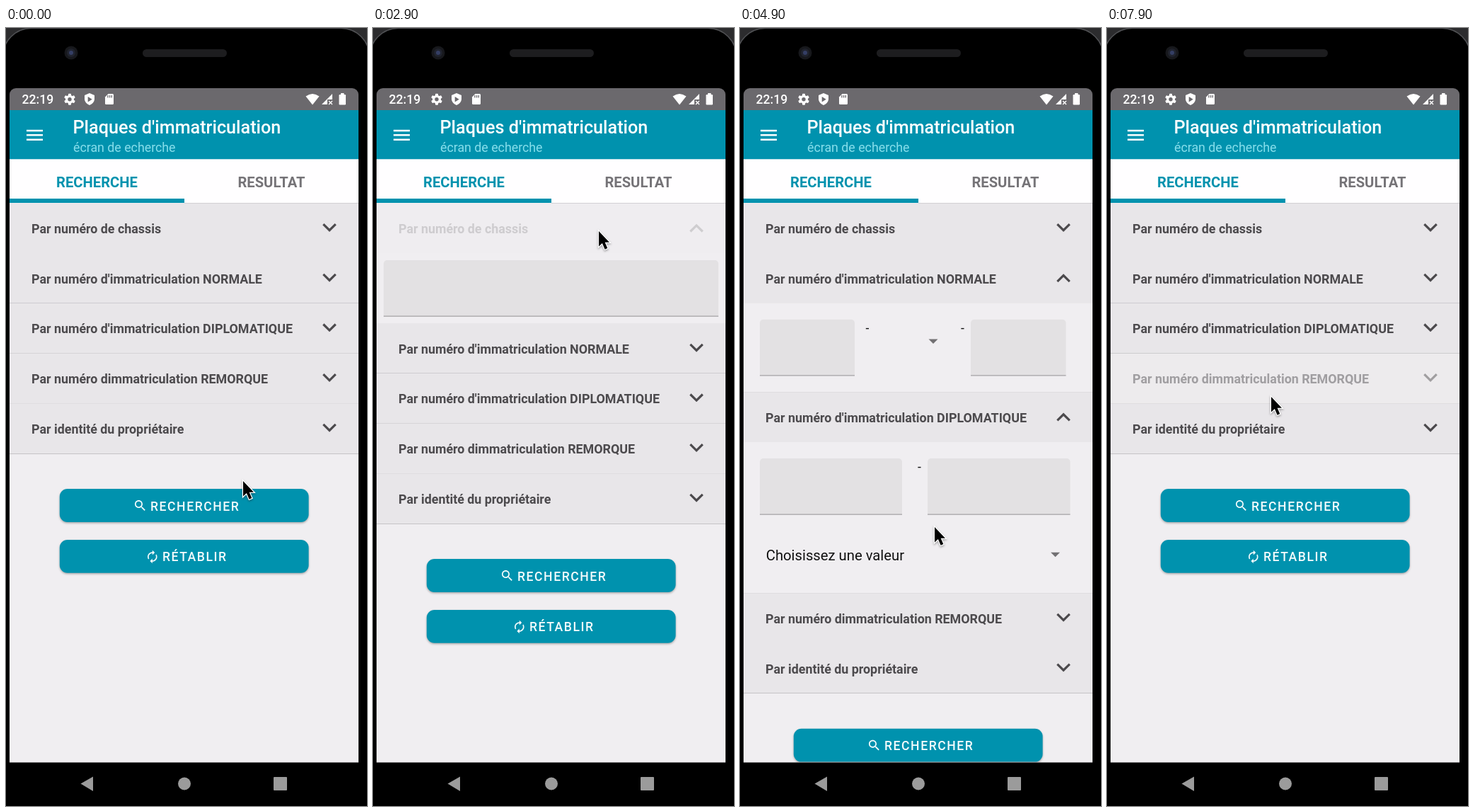
An HTML page with a canvas for the animation above (8 s loop, 510 px wide and 1099 px high).

```html
<!DOCTYPE html>
<html lang="fr">
<head>
<meta charset="utf-8">
<title>Plaques d'immatriculation</title>
<style>
  html, body { margin: 0; width: 100%; height: 100%; overflow: hidden; background: #000; }
  canvas { display: block; }
</style>
</head>
<body>
<canvas id="stage" width="510" height="1099"></canvas>
<script>
const c = document.getElementById('stage').getContext('2d');
const LOOP = 8000, STEP = 100;
const TEAL = '#0092ae', PAGE = '#f0eef1', ROW = '#e8e6e9', INK = '#4c4a4d', LINE = '#c5c3c6';
const LIST_TOP = 247.4, ROW_H = 70.7;

const sections = [
  { title: 'Par numéro de chassis', body: 99, draw: y => field(15, y + 10, 473) },
  { title: "Par numéro d'immatriculation NORMALE", body: 125.5, draw: y => {
    field(28, y + 23, 134); field(326, y + 23, 134.5);
    dash(180, y); dash(314.5, y); dropArrow(273, y + 54);
  } },
  { title: "Par numéro d'immatriculation DIPLOMATIQUE", body: 213.2, draw: y => {
    pair(y);
    text('Choisissez une valeur', 36.7, y + 167.4, 20.25, 400, '#111');
    dropArrow(445.5, y + 159);
  } },
  { title: 'Par numéro dimmatriculation REMORQUE', body: 125.5, draw: pair },
  { title: 'Par identité du propriétaire', body: 0, draw: () => {} }
];

// section, press time, time when it toggles and the finger lifts
const taps = [
  [0, 2200, 2400], [0, 2800, 3000], [1, 3250, 3700], [2, 4400, 4600],
  [3, 5250, 5600], [1, 6000, 6280], [2, 6700, 6900], [3, 7500, 7830]
];

// time, x, y of the pointer tip
const pointerPath = [
  [0, 333, 637], [300, 345, 625], [400, 345, 625], [1300, 358, 291], [1700, 317, 284],
  [3000, 317, 284], [3300, 309, 378], [3900, 309, 378], [4300, 288, 540], [4700, 288, 540],
  [4900, 273, 702], [5300, 266, 822], [5600, 266, 822], [6100, 254, 322], [6500, 254, 322],
  [6700, 231, 437], [7100, 231, 437], [7500, 230, 518], [LOOP, 230, 518]
];

const searchIcon = new Path2D('M15.5 14h-.79l-.28-.27C15.41 12.59 16 11.11 16 9.5 16 5.91 13.09 3 9.5 3S3 5.91 3 9.5 5.91 16 9.5 16c1.61 0 3.09-.59 4.23-1.57l.27.28v.79l5 4.99L20.49 19l-4.99-5zm-6 0C7.01 14 5 11.99 5 9.5S7.01 5 9.5 5 14 7.01 14 9.5 11.99 14 9.5 14z');
const resetIcon = new Path2D('M12 6v3l4-4-4-4v3c-4.42 0-8 3.58-8 8 0 1.57.46 3.03 1.24 4.26L6.7 14.8c-.45-.83-.7-1.79-.7-2.8 0-3.31 2.69-6 6-6zm6.76 1.74L17.3 9.2c.44.84.7 1.79.7 2.8 0 3.31-2.69 6-6 6v-3l-4 4 4 4v-3c4.42 0 8-3.58 8-8 0-1.57-.46-3.03-1.24-4.26z');
const pointer = new Path2D('M0 0V24L5.4 19 9.6 28.5 13.6 26.8 9.6 17.5H16.6Z');

const clamp = v => Math.max(0, Math.min(1, v));

function rect(x, y, w, h, color, radius = 0) {
  c.fillStyle = color;
  c.beginPath();
  c.roundRect(x, y, w, h, radius);
  c.fill();
}

function disc(x, y, r, color) {
  c.fillStyle = color;
  c.beginPath();
  c.arc(x, y, r, 0, 7);
  c.fill();
}

function shape(points, color) {
  c.fillStyle = color;
  c.fill(new Path2D(points));
}

function text(str, x, y, size, weight, color, align = 'left', spacing = 0) {
  c.font = `${weight} ${size}px Roboto, sans-serif`;
  c.letterSpacing = spacing + 'px';
  c.textAlign = align;
  c.fillStyle = color;
  c.fillText(str, x, y);
}

function field(x, y, w) {
  rect(x, y, w, 79, '#e3e1e3', [5, 5, 0, 0]);
  rect(x, y + 78.5, w, 1.2, '#a3a1a4');
}

function dash(x, y) {
  text('-', x, y + 41, 17.6, 400, '#111', 'center');
}

function pair(y) {
  field(28, y + 23, 201);
  field(265, y + 23, 201.5);
  dash(253.5, y);
}

function dropArrow(x, y) {
  shape(`M${x - 6.5} ${y - 3.2}h13l-6.5 6.5z`, '#727073');
}

function chevron(y, open) {
  const d = open ? -4.3 : 4.3;
  c.strokeStyle = INK;
  c.lineWidth = 3.2;
  c.beginPath();
  c.moveTo(448.3, y - d);
  c.lineTo(457, y + d);
  c.lineTo(465.7, y - d);
  c.stroke();
}

function button(y, label, labelX, icon, iconX, iconY) {
  c.save();
  c.shadowColor = 'rgba(0,0,0,.3)';
  c.shadowBlur = 3;
  c.shadowOffsetY = 1.5;
  rect(75.8, y, 351.8, 46.8, TEAL, 11);
  c.restore();
  text(label, labelX, y + 30.4, 17.58, 500, '#f4fbfc', 'left', 1.57);
  c.save();
  c.translate(iconX, y + iconY);
  c.scale(.85, .85);
  c.fill(icon);
  c.restore();
}

function stateAt(t) {
  const open = sections.map(() => false), alpha = sections.map(() => 1);
  for (const [i, press, lift] of taps) {
    if (t < press) continue;
    alpha[i] = t < lift ? 1 - .8 * clamp((t - press) / 100) : .2 + .8 * clamp((t - lift) / 200);
    if (t >= lift) open[i] = !open[i];
  }
  return { open, alpha };
}

function drawPhone() {
  rect(0, 0, 510, 1099, '#2c2c2e');
  c.strokeStyle = '#505154';
  c.lineWidth = 3;
  c.beginPath();
  c.roundRect(-4, 1, 517, 1200, 40);
  c.stroke();
  c.fillStyle = '#000';
  c.fill();
  disc(92, 35, 9.5, '#17181c');
  disc(92, 35, 6, '#20232e');
  disc(92, 35, 3, '#343e64');
  rect(193, 30, 119, 11, '#1d1d1f', 5.5);
  shape('M105.5 1067.5L123 1057.5V1078Z', '#9b9b9b');
  disc(252, 1067.5, 9, '#9b9b9b');
  rect(378, 1058, 19, 19, '#9b9b9b', 1);
}

function drawStatus() {
  const bar = '#6b696d', white = '#fff';
  rect(5, 85, 493, 31, bar, [9, 9, 0, 0]);
  text('22:19', 22.5, 107, 17.58, 500, white);
  for (let i = 0; i < 6; i++) {
    c.save();
    c.translate(90, 100.7);
    c.rotate(i * Math.PI / 3);
    rect(-2, -8, 4, 4.5, white, 1);
    c.restore();
  }
  disc(90, 100.7, 6, white);
  disc(90, 100.7, 2.7, bar);
  shape('M118 92l7 3v5c0 4-3 7.5-7 9-4-1.5-7-5-7-9v-5z', white);
  shape('M115.7 97v7.5l6-3.75z', bar);
  shape('M144.5 93h6q1.5 0 1.5 1.5v12q0 1.5-1.5 1.5h-9q-1.5 0-1.5-1.5v-9z', white);
  for (const x of [143.3, 146, 148.7]) rect(x, 95, 1.3, 3.5, bar);
  shape('M433 108.5L423.5 96.5Q433 89.5 442.5 96.5Z', white);
  shape('M446 108L461 93V101H454V108Z', white);
  c.strokeStyle = white;
  c.lineWidth = 1.4;
  c.stroke(new Path2D('M456 103l5 5m0-5l-5 5'));
  rect(470.5, 94, 9.5, 14.5, white, 1.2);
  rect(473, 92, 4.5, 3, white);
}

function drawBars() {
  rect(5, 115.5, 493, 70, TEAL);
  for (const y of [143.7, 150.1, 156.5]) rect(29, y, 23, 2.5, '#fff');
  text("Plaques d'immatriculation", 94.5, 149, 25.2, 500, '#fff');
  text('écran de echerche', 95, 174.5, 17.8, 400, '#86deeb');
  rect(5, 185.5, 493, 61.5, '#fffeff');
  text('RECHERCHE', 128.5, 224.6, 20.2, 700, TEAL, 'center');
  text('RESULTAT', 375, 224.6, 20.2, 700, '#757377', 'center');
  rect(5, 241, 247, 6, TEAL);
  rect(252, 247, 246, 1, '#d3d1d4');
}

function drawList({ open, alpha }) {
  let y = LIST_TOP;
  sections.forEach((s, i) => {
    c.globalAlpha = alpha[i];
    rect(5, y, 493, ROW_H, ROW);
    text(s.title, 36, y + 42.6, 17.85, 700, INK);
    chevron(y + (open[i] ? 35.8 : 34), open[i]);
    c.globalAlpha = 1;
    y += ROW_H;
    if (open[i]) {
      s.draw(y);
      y += s.body;
    }
    rect(5, Math.floor(y + .15), 493, 1, LINE);
  });
  button(y + 50.2, 'RECHERCHER', 204, searchIcon, 179.4, 13.4);
  button(y + 122.1, 'RÉTABLIR', 221, resetIcon, 196.6, 13.8);
}

function drawPointer(t) {
  const k = pointerPath.findIndex(p => p[0] > t);
  const [t0, x0, y0] = pointerPath[k - 1], [t1, x1, y1] = pointerPath[k];
  const u = (t - t0) / (t1 - t0), e = u * u * (3 - 2 * u);
  c.save();
  c.translate(x0 + (x1 - x0) * e + 2, y0 + (y1 - y0) * e + 3);
  c.scale(.9, .9);
  c.lineWidth = 2.8;
  c.strokeStyle = '#fff';
  c.shadowColor = 'rgba(0,0,0,.35)';
  c.shadowBlur = 3;
  c.shadowOffsetY = 1.5;
  c.stroke(pointer);
  c.shadowColor = 'transparent';
  c.fillStyle = '#000';
  c.fill(pointer);
  c.restore();
}

function frame() {
  const t = Math.floor(performance.now() % LOOP / STEP) * STEP;
  drawPhone();
  c.save();
  c.beginPath();
  c.rect(5, 85, 493, 952.5);
  c.clip();
  rect(5, 116, 493, 922, PAGE);
  drawList(stateAt(t));
  drawBars();
  drawStatus();
  c.restore();
  drawPointer(t);
  requestAnimationFrame(frame);
}
frame();
</script>
</body>
</html>
```
